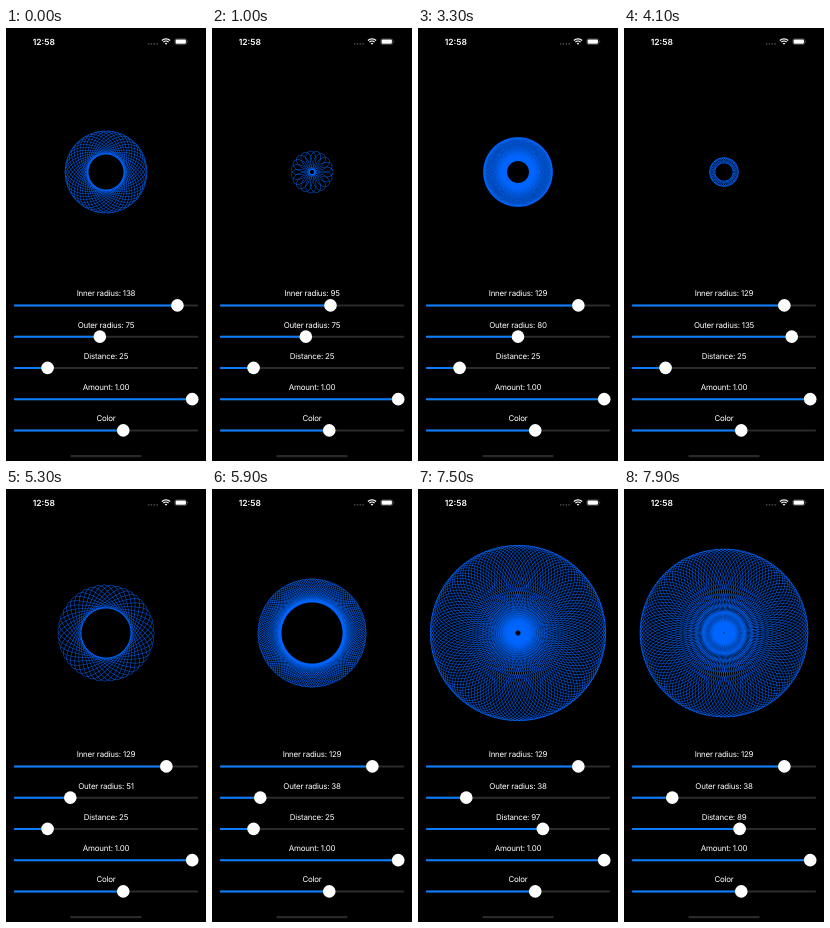
An HTML page with a canvas for the animation above (8 s loop, 200 px wide and 433 px high).

```html
<!DOCTYPE html>
<html lang="en">
<head>
<meta charset="utf-8">
<title>Spirograph</title>
<style>
  html, body { margin: 0; width: 100%; height: 100%; overflow: hidden; background: #000; }
  canvas { position: absolute; left: 0; top: 44px; width: 200px; height: 200px; }
  svg { position: absolute; left: 0; top: 0; }
  text {
    font: 400 7.94px Inter, Roboto, sans-serif;
    letter-spacing: -.2px;
    fill: #fff;
    text-anchor: middle;
    text-rendering: geometricPrecision;
  }
  .clock { font-size: 8.5px; font-weight: 600; letter-spacing: 0; }
</style>
</head>
<body>
<canvas id="stage" width="200" height="200"></canvas>
<svg id="ui" width="200" height="433" viewBox="0 0 200 433">
  <text class="clock" x="37.8" y="16.8">12:58</text>
  <g fill="#48484a">
    <circle cx="142.7" cy="15.8" r=".85"/><circle cx="145.5" cy="15.8" r=".85"/>
    <circle cx="148.3" cy="15.8" r=".85"/><circle cx="151.1" cy="15.8" r=".85"/>
  </g>
  <g fill="none" stroke="#fff" stroke-width="1.3">
    <path d="M155.9 12.5a5.9 5.9 0 0 1 8.2 0"/>
    <path d="M157.4 14.1a3.7 3.7 0 0 1 5.2 0"/>
  </g>
  <path d="M158.7 15.3a1.9 1.9 0 0 1 2.6 0L160 16.7z" fill="#fff"/>
  <rect x="168.8" y="10.8" width="11.9" height="5.8" rx="1.7" fill="none" stroke="#777" stroke-width=".5"/>
  <rect x="169.6" y="11.5" width="10.3" height="4.3" rx="1" fill="#fff"/>
  <path d="M181.4 12.7q.9.3.9.9t-.9.9z" fill="#777"/>
  <rect x="64.3" y="427" width="71.4" height="2.3" rx="1.15" fill="#29292b"/>
</svg>
<script>
const LOOP = 8000, STEP = 100;
const SCALE = 200 / 428;   // stage pixels per point
const OVERSAMPLE = 4;
const TRACK = { left: 7.9, right: 192.1, inset: 13.8, thumb: 6.3 };

// Slider drags as [time, value] points
const drags = {
  inner: [[400, 138], [1000, 95], [1600, 52], [2200, 120], [2300, 122], [2500, 129]],
  outer: [[3100, 75], [4000, 128], [4100, 135], [4200, 137], [4900, 60],
          [5000, 55], [5100, 52], [5200, 52], [5900, 38]],
  distance: [[6500, 25], [7000, 61], [7400, 93], [7600, 99], [7900, 89]]
};

// Smooth monotone interpolation, at rest in every turning point
function valueAt(points, t) {
  const last = points.length - 1;
  if (t <= points[0][0]) return points[0][1];
  if (t >= points[last][0]) return points[last][1];
  const slope = i => (points[i + 1][1] - points[i][1]) / (points[i + 1][0] - points[i][0]);
  const tangent = i => {
    if (i === 0 || i === last) return 0;
    const a = slope(i - 1), b = slope(i);
    return a * b <= 0 ? 0 : Math.sign(a) * Math.min(Math.abs(a), Math.abs(b));
  };
  const i = points.findIndex(p => p[0] > t) - 1;
  const [t0, v0] = points[i], [t1, v1] = points[i + 1];
  const span = t1 - t0, u = (t - t0) / span;
  const blend = u * u * (3 - 2 * u);
  return Math.round(v0 + (v1 - v0) * blend
    + span * (tangent(i) * u * (1 - u) ** 2 + tangent(i + 1) * u * u * (u - 1)));
}

const ui = document.getElementById('ui');

function add(tag, attributes) {
  const node = document.createElementNS(ui.namespaceURI, tag);
  for (const name in attributes) node.setAttribute(name, attributes[name]);
  return ui.appendChild(node);
}

function makeSlider(row, min, max, caption) {
  const y = 277.5 + row * 31.25;
  const bar = { x: TRACK.left, y: y - .9, height: 1.8, rx: .9 };
  const label = add('text', { x: 100, y: y - 9.1 });
  add('rect', { ...bar, width: TRACK.right - TRACK.left, fill: '#2b2b2e' });
  const fill = add('rect', { ...bar, fill: '#0a7cff' });
  const thumb = add('circle', { cy: y - .1, r: TRACK.thumb, fill: '#fff' });
  return value => {
    const x = TRACK.inset + (200 - 2 * TRACK.inset) * (value - min) / (max - min);
    fill.setAttribute('width', x - TRACK.left);
    thumb.setAttribute('cx', x);
    label.textContent = caption(value);
  };
}

const setInner = makeSlider(0, 10, 150, v => `Inner radius: ${v}`);
const setOuter = makeSlider(1, 10, 150, v => `Outer radius: ${v}`);
const setDistance = makeSlider(2, 1, 150, v => `Distance: ${v}`);
makeSlider(3, 0, 1, v => `Amount: ${v.toFixed(2)}`)(1);
makeSlider(4, 0, 1, () => 'Color')(.6);

const stage = document.getElementById('stage').getContext('2d');
const buffer = document.createElement('canvas');
buffer.width = buffer.height = 200 * OVERSAMPLE;
const pen = buffer.getContext('2d');
stage.imageSmoothingQuality = 'high';
stage.filter = 'blur(.3px)';

const gcd = (a, b) => b ? gcd(b, a % b) : a;

function drawSpirograph(inner, outer, distance) {
  const difference = inner - outer;
  const ratio = difference / outer;
  const turns = outer / gcd(inner, outer);
  const segments = 220;
  const zoom = SCALE * OVERSAMPLE, center = buffer.width / 2;

  pen.setTransform(1, 0, 0, 1, 0, 0);
  pen.clearRect(0, 0, buffer.width, buffer.height);
  pen.setTransform(zoom, 0, 0, zoom, center, center);
  pen.strokeStyle = 'hsl(216 100% 50%)';
  pen.lineWidth = 1;
  for (let turn = 0; turn < turns; turn++) {
    pen.beginPath();
    for (let i = 0; i <= segments; i++) {
      const theta = 2 * Math.PI * (turn + i / segments);
      pen.lineTo(
        difference * Math.cos(theta) + distance * Math.cos(ratio * theta),
        difference * Math.sin(theta) - distance * Math.sin(ratio * theta));
    }
    pen.stroke();
  }
  stage.clearRect(0, 0, 200, 200);
  stage.drawImage(buffer, 0, 0, 200, 200);
}

let shown = '';

function render(now) {
  const t = Math.floor(now % LOOP / STEP) * STEP;
  const inner = valueAt(drags.inner, t);
  const outer = valueAt(drags.outer, t);
  const distance = valueAt(drags.distance, t);
  const state = [inner, outer, distance].join();
  if (state !== shown) {
    shown = state;
    setInner(inner);
    setOuter(outer);
    setDistance(distance);
    drawSpirograph(inner, outer, distance);
  }
}

const start = performance.now();
function tick() {
  render(performance.now() - start);
  requestAnimationFrame(tick);
}
tick();
</script>
</body>
</html>
```
